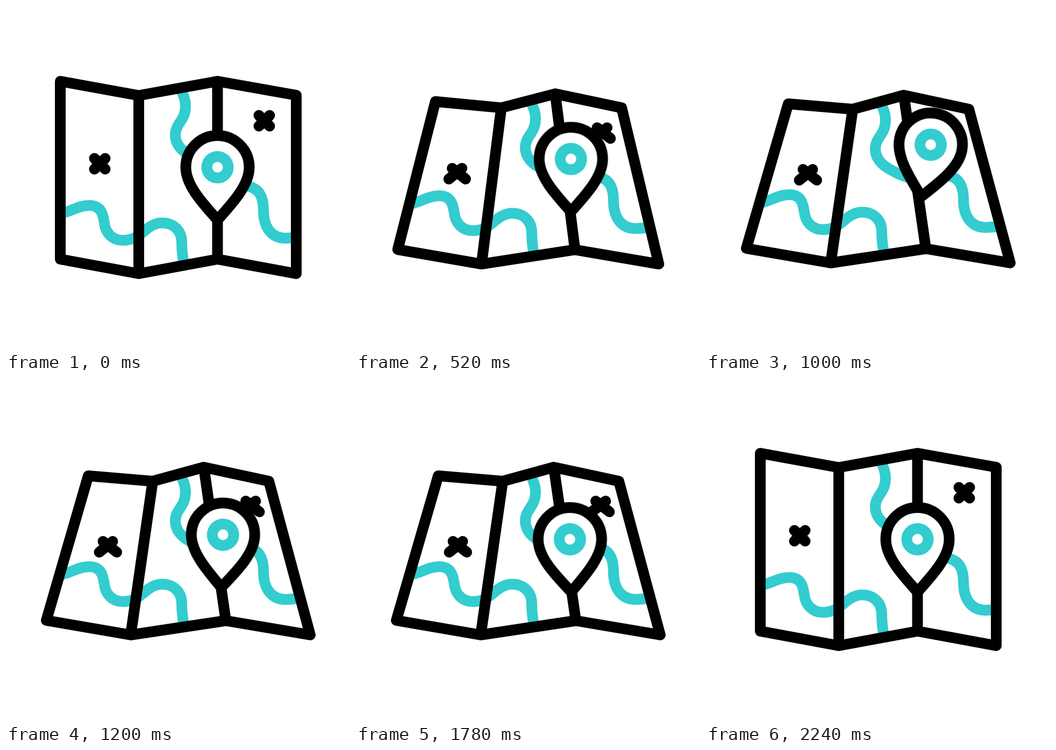
Animation of 640 by 640 pixels, one loop 2400 ms. Source, as an HTML page:

```html
<!DOCTYPE html>
<html lang="en">
<head>
<meta charset="utf-8">
<title>Folding map</title>
<style>
  html, body { margin: 0; width: 100%; height: 100%; overflow: hidden; background: #fff; }
  svg { display: block; width: 100%; height: 100%; }
  path, circle { fill: none; stroke: #000; stroke-width: 20; stroke-linejoin: round; }
  .sheet, .mark { stroke-linecap: round; }
  .river path, .eye { stroke: #33cccf; }
  .pin .body { fill: #fff; }

  .anim { animation: 2400ms cubic-bezier(.333, 0, .667, 1) infinite; }

  /* The map tilts back from 200 to 600 ms and returns from 1800 to 2200 ms. */
  .sheet { animation-name: sheet; }
  .left { animation-name: left; }
  .right { animation-name: right; }
  .upper { animation-name: upper; }
  .lower { animation-name: lower; }
  .base { animation-name: base; }

  /* The pin hops and leans around its tip. */
  .lift { animation-name: lift; }
  .tilt { animation-name: tilt; transform-origin: 393.5px 398px; }

  @keyframes sheet {
    0%, 8.333%, 91.667%, 100% {
      d: path("M101 140L247 166.500L393.500 140L540 166L540 498L393.500 471L247 498L101 471ZM247 166.500L247 498M393.500 140L393.500 471");
    }
    25%, 75% {
      d: path("M153 182L273 192L368 166L489 192L566 478L409 451.500L232 478L75 451ZM273 192L232 478M368 166L409 451.500");
    }
  }
  @keyframes left {
    0%, 8.333%, 91.667%, 100% { d: path("M164.500 283.500L184.500 303.500M184.500 283.500L164.500 303.500"); }
    25%, 75% { d: path("M180.500 304L206 324M198.500 304L173.500 324"); }
  }
  @keyframes right {
    0%, 8.333%, 91.667%, 100% { d: path("M470.500 203.500L490.500 223.500M490.500 203.500L470.500 223.500"); }
    25%, 75% { d: path("M446 229L471.500 249M464.500 229L438.500 249"); }
  }
  @keyframes upper {
    0%, 8.333%, 91.667%, 100% { transform: translateY(0); }
    25%, 75% { transform: translateY(26px); }
  }
  @keyframes lower {
    0%, 8.333%, 91.667%, 100% { transform: translateY(0); }
    25%, 75% { transform: translateY(-20px); }
  }
  @keyframes base {
    0%, 8.333%, 91.667%, 100% { transform: translateX(0); }
    25%, 75% { transform: translateX(7px); }
  }
  @keyframes lift {
    0%, 8.333%, 53.333%, 100% { transform: translateY(0); }
    41.667% { transform: translateY(-43.5px); }
  }
  @keyframes tilt {
    0%, 22%, 84%, 100% { transform: rotate(0deg); }
    41.667% { transform: rotate(10.3deg); }
    54% { transform: rotate(-.8deg); }
    75% { transform: rotate(-1.5deg); }
  }
</style>
</head>
<body>
<svg viewBox="0 0 640 640">
  <g class="river">
    <path class="anim upper" d="M322 150C330 163 334 174 334 186C334 214 315 218 315 240C315 262 335 275 350 282C362 289 372 293 395 296"/>
    <g class="anim lower">
      <path d="M101 385.500C118 385 132 371 155 371C180 371 181 393 183 404C185 422 198 436 217 436C235 436 245 429 257 419C266 411 277 403.500 290 403.500C312 403.500 327 418 327 440C327 452 328 464 331 480"/>
      <path d="M430 331C465 335 479 345 479 380C479 412 494 432 520 432C530 432 538 431 546 429"/>
    </g>
  </g>
  <path class="mark anim left"/>
  <path class="mark anim right"/>
  <path class="sheet anim"/>
  <g class="pin anim base">
    <g class="anim lift">
      <g class="anim tilt">
        <path class="body" d="M393.500 398C362 363 334.500 332 334.500 300A59 59 0 0 1 452.500 300C452.500 332 425 363 393.500 398Z"/>
        <circle class="eye" cx="393.5" cy="300" r="20"/>
      </g>
    </g>
  </g>
</svg>
</body>
</html>
```
